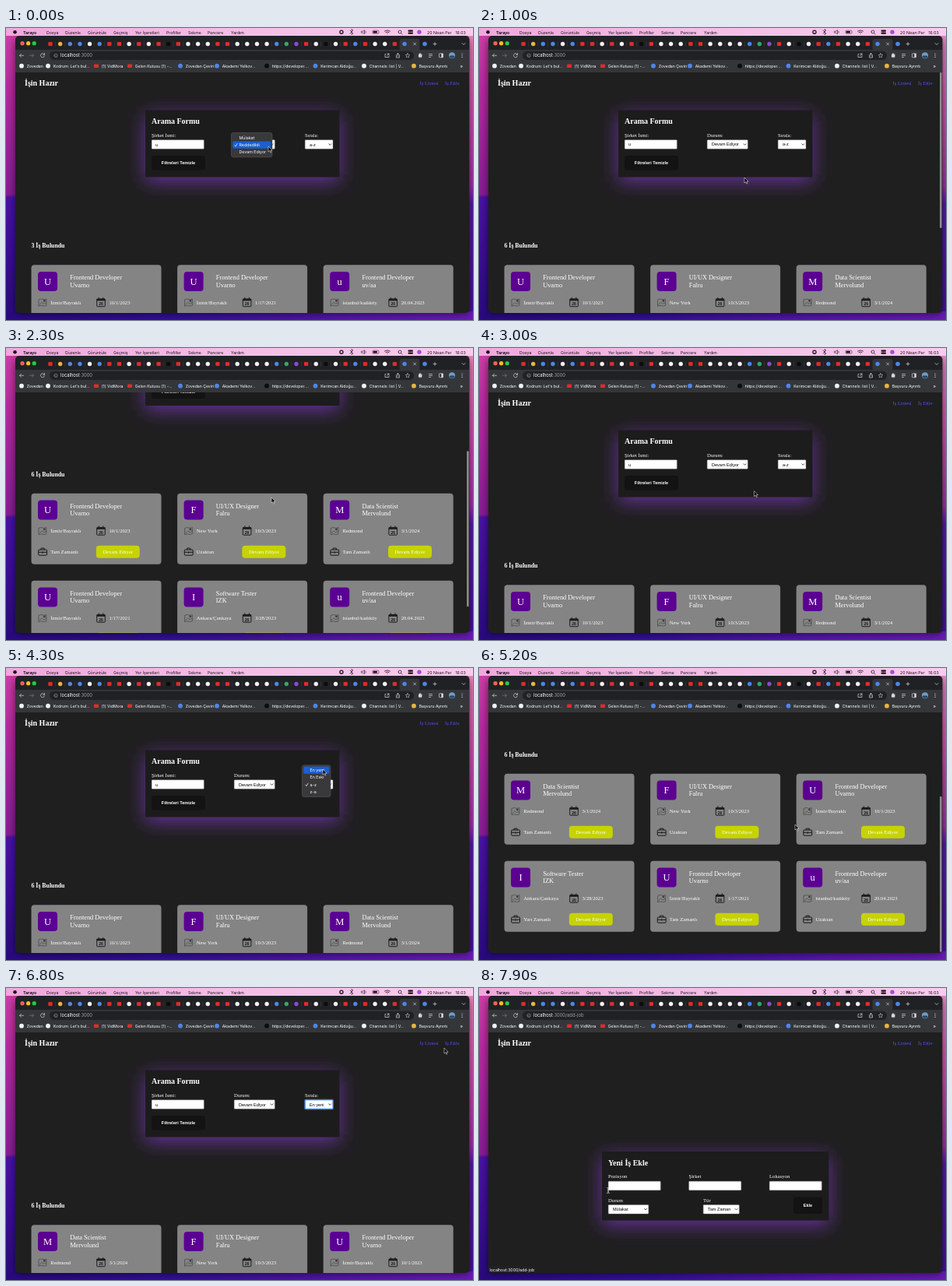
Recreate the animation shown at these times as an HTML page. Size 600 by 375 pixels, loop 8 s.

```html
<!DOCTYPE html>
<html lang="tr">
<head>
<meta charset="utf-8">
<title>İşin Hazır</title>
<style>
html, body { margin: 0; width: 100%; height: 100%; overflow: hidden; background: #1f1f1f; }
svg { display: block; width: 100vw; height: 100vh; }
text { white-space: pre; }
.ui { font-family: Inter, Roboto, sans-serif; }
.serif { font-family: "Liberation Serif", "Times New Roman", serif; }
.form { font-family: "Liberation Sans", Arial, sans-serif; }
.b { font-weight: 700; }
.m { text-anchor: middle; }
</style>
</head>
<body>
<svg id="stage" viewBox="0 0 600 375" preserveAspectRatio="none"></svg>
<script>
const LOOP = 8000, MAX_SCROLL = 168.5;
const INK = '#1a101c', LINK = '#544ff5';
const stage = document.getElementById('stage');
const el = id => document.getElementById(id);

// Drawing helpers
const rect = (x, y, w, h, fill, r = 0, more = '') =>
  `<rect x="${x}" y="${y}" width="${w}" height="${h}" rx="${r}" fill="${fill}" ${more}/>`;
const dot = (x, y, r, fill) => `<circle cx="${x}" cy="${y}" r="${r}" fill="${fill}"/>`;
const line = (d, color = '#d5d6d8', w = .7) =>
  `<path d="${d}" fill="none" stroke="${color}" stroke-width="${w}" stroke-linecap="round" stroke-linejoin="round"/>`;
const text = (x, y, size, str, cls = 'serif', fill = '#fff') =>
  `<text x="${x}" y="${y}" font-size="${size}" class="${cls}" fill="${fill}">${str}</text>`;
const group = (id, body, more = '') => `<g id="${id}" ${more}>${body}</g>`;
const gradient = (id, stops, down) => `<linearGradient id="${id}" ${down ? 'x2="0" y2="1"' : ''}>` +
  stops.map(([o, c]) => `<stop offset="${o}" stop-color="${c}"/>`).join('') + '</linearGradient>';

// Desktop, menu bar and browser frame
const desktop = () => rect(0, 0, 300, 375, 'url(#wallLeft)') + rect(300, 0, 300, 375, 'url(#wallRight)') +
  rect(0, 364, 600, 11, 'url(#floor)') + rect(12, 14, 583.5, 353, '#000', 6, 'opacity=".6" filter="url(#shade)"');

const menu = [[52, 'Dosya'], [76, 'Düzenle'], [105, 'Görüntüle'], [138, 'Geçmiş'], [166, 'Yer İşaretleri'],
  [206, 'Profiller'], [234, 'Sekme'], [259, 'Pencere'], [289, 'Yardım']];

const menuBar = () => rect(0, 0, 600, 10, 'url(#bar)') + dot(11.5, 5.2, 2.3, INK) +
  text(22, 7.5, 5.2, 'Tarayo', 'ui b', INK) +
  menu.map(([x, s]) => text(x, 7.5, 5.2, s, 'ui', INK)).join('') +
  dot(431, 5.2, 2.7, INK) + dot(431, 5.2, 1.4, '#f3bfe4') +
  line('M442 3l4 4-2 1.5v-7l2 1.5-4 4M457 4.2h1.5l2-1.5v5l-2-1.5h-1.5zM462 4q1 1.2 0 2.4', INK, .6) +
  rect(471, 3.2, 8, 4, 'none', 1, `stroke="${INK}" stroke-width=".5"`) + rect(471.8, 4, 5, 2.4, INK, .5) +
  line('M486.5 4q3.5-2.5 7 0M488 5.6q2-1.300 4 0M490 7.2v.1', INK, .8) +
  line('M507.7 6.7l1.5 1.5M504 5a2 2 0 1 0 4 0a2 2 0 1 0-4 0', INK, .7) +
  rect(516.5, 2.6, 6.5, 2.2, INK, 1.1) + rect(516.5, 5.6, 6.5, 2.2, INK, 1.1) +
  dot(531, 5.2, 2.6, '#a04be0') +
  text(541, 7.5, 5.2, '20 Nisan Per', 'ui', INK) + text(577.5, 7.5, 5.2, '16:03', 'ui', INK);

const hue = { w: '#f1f1f1', r: '#e02b2b', b: '#4b86e8', y: '#e8b63a', g: '#35a568', p: '#8a4ad0', k: '#0c0c0d' };
const tabs = 'rybbwbrrwrwrkrwwwrrwwwwbgprwkwrbrwwrb';

const tabStrip = () => {
  let s = rect(12, 10, 583.5, 22, '#202124', 5) + rect(505.5, 14, 26, 15, '#35363a', 3);
  ['#ff5f57', '#febc2e', '#28c840'].forEach((c, i) => s += dot(21 + i * 7.6, 19.7, 2.6, c));
  [...tabs].forEach((c, i) => {
    const x = 57 + i * 12.64;
    s += c === 'r' ? rect(x - 2.7, 18, 5.4, 5, hue.r, 1) : dot(x, 20.5, 2.7, hue[c]);
    if (i < 35) s += rect(x + 6.1, 17.5, .4, 6, '#4b4c50');
  });
  return s + line('M523.7 19l3 3m0-3l-3 3') + dot(538, 20.5, 2.8, hue.b) +
    line('M549 20.5h4m-2-2v4M586 19.5l2 2 2-2');
};

const bookmarks = [[20, 'w', 'Zovedan'], [54, 'w', "Kodrum: Let's bul..."], [116, 'r', '(1) VidMora'],
  [159, 'r', 'Gelen Kutusu (1) -...'], [224, 'b', 'Zovedan Çeviri'], [271, 'b', 'Akademi Yelkov...'],
  [335, 'k', 'https://developer....'], [397.5, 'b', 'Kerimcan Aldoğu...'], [460, 'w', 'Channels: list | V...'],
  [524, 'y', 'Başvuru Ayrıntı']];

const toolbar = () => rect(12, 28, 583.5, 29, '#35363a') + rect(56, 29.7, 468, 11.3, '#202124', 5.6) +
  line('M22.5 35.3h-5m2-2l-2 2 2 2') + line('M30.5 35.3h5m-2-2l2 2-2 2', '#77787b') +
  line('M49.2 34a2.5 2.5 0 1 0 .2 2M49.5 32.6v1.7h-1.7') +
  line('M61.8 35.3a2.2 2.2 0 1 0 4.4 0a2.2 2.2 0 1 0-4.4 0M64 35.2v1.2', '#b5b6b8', .5) +
  line('M488 33.5h-1v4h5v-1.5M489.5 35.5l2.5-2.5m-2 0h2v2M501.5 34.5v3.5h4v-3.5M503.5 36v-3.5m-1.2 1l1.2-1 1.2 1') +
  line('M516 32.5l.8 1.900 2 .1-1.5 1.4.5 2-1.8-1.1-1.8 1.1.5-2-1.5-1.4 2-.1z', '#d5d6d8', .5) +
  rect(530, 33.5, 4.4, 4.2, '#d5d6d8', .7) + dot(532, 33.2, 1, '#d5d6d8') +
  line('M543.5 33.5h4m-4 2h4m-4 2h2') + rect(556.5, 32.8, 5, 5, 'none', .6, 'stroke="#d5d6d8" stroke-width=".7"') +
  rect(559.3, 32.8, 2.2, 5, '#d5d6d8') + dot(573, 35.3, 4, '#6f9cc4') +
  '<path d="M569.3 36.5q3.7-2.5 7.4 0a4 4 0 0 1-7.4 0" fill="#2b4a63"/>' +
  [33.2, 35.3, 37.4].map(y => dot(586, y, .6, '#d5d6d8')).join('') +
  group('urlHome', text(70, 37.3, 5.8, 'localhost<tspan fill="#9aa0a6">:3000</tspan>', 'ui')) +
  group('urlAdd', text(70, 37.3, 5.8, 'localhost<tspan fill="#9aa0a6">:3000/add-job</tspan>', 'ui')) +
  bookmarks.map(([x, c, s]) => (c === 'r' ? rect(x - 3, 46.4, 6, 4.6, hue.r, 1) : dot(x, 48.7, 2.9, hue[c])) +
    text(x + 6.7, 50.6, 5.15, s, 'ui')).join('') +
  text(583.5, 50.6, 6, '»', 'ui');

// Page parts
const header = text(24, 74, 10, 'İşin Hazır', 'serif b') +
  text(531.5, 73.4, 6.67, 'İş Listesi', 'serif', LINK) + text(564, 73.4, 6.67, 'İş Ekle', 'serif', LINK);

const panel = (x, y, w, h, title) => rect(x, y + 6, w, h, '#663399', 0, 'filter="url(#glow)"') +
  rect(x, y, w, h, '#1c1c1c') + text(x + 8, y + 17.5, 10, title, 'serif b');
const field = (x, y, label, w = 67.5) => text(x, y - 3.7, 6.67, label) +
  rect(x + .2, y + .2, w - .4, 11.6, '#fff', .8, 'stroke="#8a8a8a" stroke-width=".4"');
const choice = (x, y, label, w, id, value) => field(x, y, label, w) +
  `<text id="${id}" x="${x + 6}" y="${y + 8}" font-size="5.55" class="form" fill="#000">${value}</text>` +
  line(`M${x + w - 5.4} ${y + 5.3}l1.5 1.5 1.5-1.5`, '#222', .8);
const button = (x, y, w, h, label) => rect(x, y, w, h, '#131313', 3) +
  text(x + w / 2, y + h / 2 + 2, 5.55, label, 'form b m');
const ring = (id, x, w) => rect(x, 143.5, w, 12, 'none', 1, `id="${id}" stroke="#3b82f0" stroke-width="1.3"`);

const jobs = [
  ['Frontend Developer', 'Uvarno', 'İzmir/Bayraklı', '10/1/2023', 'Tam Zamanlı'],
  ['UI/UX Designer', 'Falru', 'New York', '10/3/2023', 'Uzaktan'],
  ['Data Scientist', 'Mervolund', 'Redmond', '3/1/2024', 'Tam Zamanlı'],
  ['Frontend Developer', 'Uvarno', 'İzmir/Bayraklı', '1/17/2021', 'Tam Zamanlı'],
  ['Software Tester', 'IZK', 'Ankara/Çankaya', '3/28/2023', 'Yarı Zamanlı'],
  ['Frontend Developer', 'uv/aa', 'istanbul/kadıköy', '20.04.2023', 'Uzaktan']];

const mapIcon = line('M9.8 44.5l3-.8 3.5.8 3-.8v8.3l-3 .8-3.5-.8-3 .8zM10.5 51l3-3 2.5 2 3-1.5', '#3c3c3c', .6) +
  dot(16.8, 46, 1.4, '#3c3c3c');
const calendarIcon = rect(84.2, 43.6, 10.6, 9.8, 'none', .8, 'stroke="#1c1c1c" stroke-width="1"') +
  rect(84.2, 43.6, 10.6, 2.4, '#1c1c1c') + line('M86.7 42v2m5.6-2v2', '#1c1c1c', 1) +
  text(89.5, 51.8, 5, '26', 'form b m', '#1c1c1c');
const bagIcon = rect(9.2, 72.2, 10.8, 7.2, 'none', 1, 'stroke="#181818" stroke-width="1"') +
  line('M12.5 72v-1.7h4.2v1.7M9.5 75.5h10.2M14.6 75v1.5', '#181818', 1);

const card = ([title, firm, place, date, type], i) =>
  `<g transform="translate(${32.5 + i % 3 * 187.6} ${304.3 + Math.floor(i / 3) * 112})">` +
  rect(0, 0, 167, 91, '#848484', 4) + rect(8.5, 8.7, 25, 25, '#5b0092', 4) +
  text(21, 25.5, 12.5, firm[0], 'serif m') + text(49.7, 19, 8.33, title) + text(49.7, 28.5, 8.33, firm) +
  mapIcon + calendarIcon + bagIcon +
  text(24.7, 50.5, 6.67, place) + text(100, 50.5, 6.67, date) + text(24.7, 77, 6.67, type) +
  rect(83.3, 67, 56, 16, '#c6d300', 4) + text(111.3, 77.2, 6.67, 'Devam Ediyor', 'serif m') + '</g>';

const orders = [[0, 3, 5], [0, 1, 2, 3, 4, 5], [2, 1, 0, 4, 3, 5]];
const lists = orders.map((order, n) => group('list' + n,
  text(32.5, 282, 7.8, order.length + ' İş Bulundu', 'serif b') + order.map((k, i) => card(jobs[k], i)).join(''))).join('');

const home = header + panel(179, 105.5, 249.5, 86, 'Arama Formu') +
  field(187, 143.5, 'Şirket İsmi:') + text(192, 151.5, 5.55, 'u', 'form', '#000') +
  choice(293, 143.5, 'Durum:', 52.5, 'status', '') + choice(384, 143.5, 'Sırala:', 36.2, 'sort', '') +
  ring('statusRing', 293, 52.5) + ring('sortRing', 384, 36.2) +
  button(187, 164, 69, 18.5, 'Filtreleri Temizle') + lists;

const addPage = header + panel(158, 210, 291.5, 88.5, 'Yeni İş Ekle') +
  field(166, 248, 'Pozisyon') + field(269.5, 248, 'Şirket') + field(373, 248, 'Lokasyon') +
  choice(166, 278.2, 'Durum', 52, 'newStatus', 'Mülakat') + choice(288, 278.2, 'Tür', 46.5, 'newType', 'Tam Zaman') +
  button(404, 268.5, 37, 21.5, 'Ekle');

const ROW = 9.25;
const popup = (id, x, y, w, options, checked) => group(id,
  rect(x, y, w, options.length * ROW + 3.6, '#39383b', 2.5, 'stroke="#626164" stroke-width=".5"') +
  rect(x + 1.7, y + 1.8, w - 3.4, ROW, '#1b5fd0', 1.5, `id="${id}Bar"`) +
  options.map((s, i) => text(x + 10, y + 8.4 + i * ROW, 5.3, s, 'ui')).join('') +
  line(`M${x + 4.3} ${y + 6.8 + checked * ROW}l1.2 1.5 2-3.5`, '#fff', .7));

stage.innerHTML = '<defs>' +
  gradient('wallLeft', [[0, '#d040a8'], [.2, '#b92aa2'], [.57, '#8a1c96'], [.58, '#4a12a8'], [1, '#2a0a80']], true) +
  gradient('wallRight', [[0, '#f08cc8'], [.25, '#dc58b4'], [.54, '#a832ac'], [.6, '#5c1cb0'], [1, '#4412a0']], true) +
  gradient('floor', [[0, '#2a0a80'], [.35, '#32109a'], [.75, '#5a18ae'], [1, '#6a1cb8']]) +
  gradient('bar', [[0, '#f0a8dc'], [.5, '#f4bee6'], [1, '#f6cdec']]) +
  `<filter id="glow" x="-30%" y="-70%" width="160%" height="240%"><feGaussianBlur stdDeviation="12"/></filter>
  <filter id="shade"><feGaussianBlur stdDeviation="6"/></filter>
  <clipPath id="view"><path d="M12 57h583.5v304a5 5 0 0 1-5 5h-573.5a5 5 0 0 1-5-5z"/></clipPath></defs>` +
  desktop() + menuBar() + tabStrip() + toolbar() +
  `<g clip-path="url(#view)">` + rect(12, 57, 583.5, 309, '#1f1f1f') +
  group('home', home) + group('add', addPage) + rect(592, 57, 2.6, 200, '#8b8b8b', 1.3, 'id="thumb"') +
  group('hint', rect(11, 357, 62, 10, '#202124', 1.5) + text(13.5, 363.5, 5.2, 'localhost:3000/add-job', 'ui')) + '</g>' +
  popup('statusMenu', 289.5, 134.5, 52.5, ['Mülakat', 'Reddedildi', 'Devam Ediyor'], 1) +
  popup('sortMenu', 380.5, 124.8, 36.5, ['En yeni', 'En Eski', 'a-z', 'z-a'], 2) +
  group('arrow', '<path d="M0 0v7l1.7-1.5 1.2 2.6 1.1-.5-1.2-2.5h2.3z" fill="#000" stroke="#fff" stroke-width=".5"/>') +
  group('beam', line('M-1.5-3.5q1.5 0 1.5 1v5q0 1-1.5 1M1.5-3.5q-1.5 0-1.5 1v5q0 1 1.5 1', '#ddd', .7));

// Motion: [time, values...] with eased steps between
const pointer = [[0, 337, 152], [200, 337, 152], [450, 331, 159], [550, 331, 159], [900, 341, 192], [2800, 341, 192],
  [3500, 403, 150], [3800, 403, 150], [4200, 407, 130], [4500, 407, 130], [4800, 406, 201], [6200, 406, 201],
  [6900, 572, 70], [7200, 572, 70], [7700, 166, 260], [8000, 166, 260]];
const scrolling = [[0, 0], [1000, 0], [1500, 134.5], [2150, 134.5], [2300, 117.5], [2800, 0], [4700, 0],
  [5100, MAX_SCROLL], [5600, MAX_SCROLL], [5900, 18], [6000, 0], [8000, 0]];

function at(keys, t) {
  const i = keys.findIndex(k => k[0] > t), a = keys[i - 1], b = keys[i];
  const p = (t - a[0]) / (b[0] - a[0]), e = p * p * (3 - 2 * p);
  return a.slice(1).map((v, n) => v + (b[n + 1] - v) * e);
}
const show = (id, on) => el(id).style.display = on ? '' : 'none';
const highlight = (id, top, y, count) => el(id + 'Bar').setAttribute('y',
  top + 1.8 + ROW * Math.max(0, Math.min(count - 1, Math.floor((y - top - 1.8) / ROW))));

function draw(now) {
  const t = now % LOOP, [x, y] = at(pointer, t), [scroll] = at(scrolling, t);
  const picked = t >= 500, sorted = t >= 4500, adding = t >= 7200, typing = t >= 7650;
  show('home', !adding); show('urlHome', !adding);
  show('add', adding); show('urlAdd', adding);
  show('list0', !picked); show('list1', picked && !sorted); show('list2', sorted);
  el('status').textContent = picked ? 'Devam Ediyor' : 'Reddedildi';
  el('sort').textContent = sorted ? 'En yeni' : 'a-z';
  show('statusRing', picked && t < 1000); show('sortRing', sorted);
  show('statusMenu', !picked); show('sortMenu', t >= 3600 && !sorted);
  highlight('statusMenu', 134.5, y, 3); highlight('sortMenu', 124.8, y, 4);
  el('home').setAttribute('transform', `translate(0 ${-scroll})`);
  show('thumb', scroll > 0);
  el('thumb').setAttribute('y', 57 + scroll * .64);
  show('hint', t >= 6850);
  show('arrow', !typing); show('beam', typing);
  el(typing ? 'beam' : 'arrow').setAttribute('transform', `translate(${x} ${y})`);
}
const start = performance.now();
(function tick() {
  draw(performance.now() - start);
  requestAnimationFrame(tick);
})();
</script>
</body>
</html>
```
